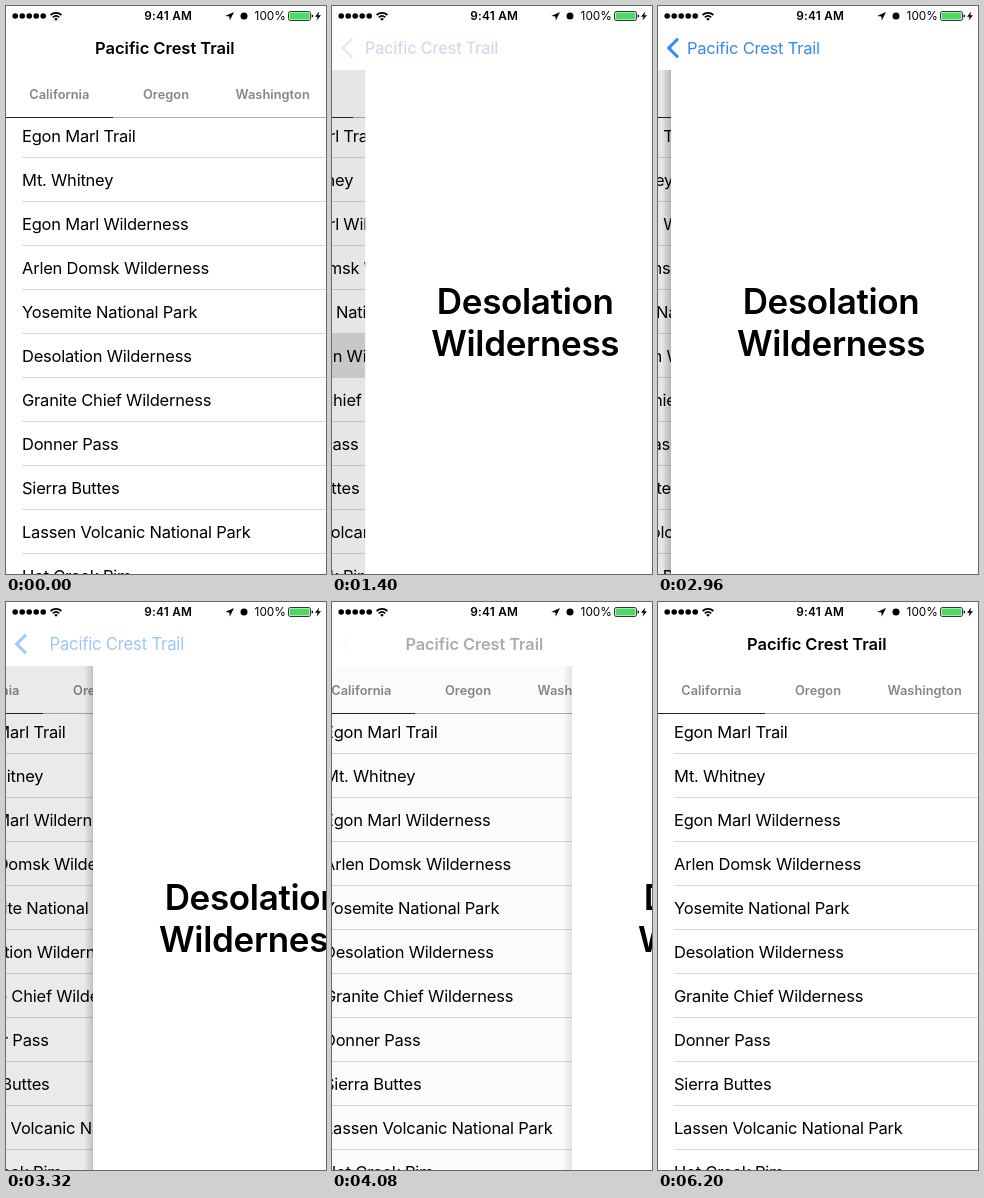
Recreate the animation shown at these times as an HTML page. Size 320x568 px, loop 6.6 s.

```html
<!DOCTYPE html>
<html lang="en">
<head>
<meta charset="utf-8">
<title>Trail list</title>
<style>
  html, body { margin: 0; width: 100%; height: 100%; overflow: hidden; background: #fff; }
  svg { display: block; width: 320px; height: 568px; }
  text { font-family: Inter, Roboto, sans-serif; white-space: pre; }
  .row { font-size: 16.5px; letter-spacing: -.22px; }
  .tab { font-size: 12.8px; font-weight: 600; letter-spacing: .05px; fill: #868686; text-anchor: middle; }
  .heading { font-size: 35px; font-weight: 600; letter-spacing: -.33px; text-anchor: middle; }
  .title { font-size: 16.5px; font-weight: 600; letter-spacing: -.03px; }
  .back { font-size: 16.5px; letter-spacing: -.22px; fill: #1c7cf2; }
  .status { font-size: 11.8px; }
</style>
</head>
<body>
<svg viewBox="0 0 320 568">
  <defs>
    <linearGradient id="fade">
      <stop offset="0" stop-opacity="0"/>
      <stop offset="1" stop-opacity=".22"/>
    </linearGradient>
  </defs>

  <g id="list">
    <rect y="64" width="320" height="504" fill="#fff"/>
    <g id="rows"></g>
    <g id="tabs"></g>
    <rect y="111" width="320" height="1" fill="#b0b0b0"/>
    <rect y="111" width="107" height="1" fill="#222"/>
  </g>
  <rect id="dim" y="64" width="320" height="504"/>

  <g id="detail">
    <rect id="shadow" x="-9" y="64" width="9" height="504" fill="url(#fade)"/>
    <rect y="64" width="320" height="504" fill="#fff"/>
    <text class="heading" x="160" y="307.7">Desolation</text>
    <text class="heading" x="160" y="350.3">Wilderness</text>
  </g>

  <rect width="320" height="64" fill="#fff"/>
  <path id="chevron" d="M20 32.8 10.8 42 20 51.2" fill="none" stroke="#1c7cf2" stroke-width="3"/>
  <text id="back" class="back">Pacific Crest Trail</text>
  <text id="title" class="title">Pacific Crest Trail</text>

  <g id="status">
    <g id="dots"></g>
    <g fill="none" stroke="#000" stroke-width="1.7">
      <path d="M44.6 9A8 8 0 0 1 55.4 9"/>
      <path d="M46.8 11.4A4.8 4.8 0 0 1 53.2 11.4"/>
    </g>
    <path d="M48.2 12.9A2.7 2.7 0 0 1 51.8 12.9L50 14.8Z"/>
    <text class="status" x="162.2" y="14.2" text-anchor="middle" font-weight="600" letter-spacing=".27">9:41 AM</text>
    <path d="M228 6 223.8 14.6 223.4 10.4 219.2 10Z"/>
    <circle cx="238" cy="10" r="3.5"/>
    <text class="status" x="248.6" y="14.2">100%</text>
    <rect x="282.5" y="5.5" width="22" height="9" rx="1.8" fill="#fff" stroke="#000" stroke-width=".8"/>
    <rect x="283.6" y="6.6" width="19.8" height="6.8" rx=".8" fill="#4cd964"/>
    <path d="M305.7 8.3Q307.2 8.8 307.2 10T305.7 11.7Z"/>
    <path d="M313.2 5.6 309 10.7H311.6L310.6 14.6 315 9.3H312.3Z"/>
  </g>
</svg>

<script>
const LOOP = 6600, STEP = 40, WIDTH = 320, SELECTED = 5;
const PUSH = { start: 1208, length: 500 };
const DRAG = [[2920, 0], [2960, 13], [3320, 87], [3760, 165], [4080, 240],
              [4120, 251], [4160, 273], [4200, 293], [4240, 309], [4280, 320]];
const places = ['Egon Marl Trail', 'Mt. Whitney', 'Egon Marl Wilderness', 'Arlen Domsk Wilderness',
  'Yosemite National Park', 'Desolation Wilderness', 'Granite Chief Wilderness', 'Donner Pass',
  'Sierra Buttes', 'Lassen Volcanic National Park', 'Hot Creek Rim'];

const get = id => document.getElementById(id);
const [list, rows, tabs, dim, detail, shadow, chevron, back, title, dots] =
  ['list', 'rows', 'tabs', 'dim', 'detail', 'shadow', 'chevron', 'back', 'title', 'dots'].map(get);

function add(parent, tag, attrs, text = '') {
  const node = document.createElementNS(parent.namespaceURI, tag);
  for (const key in attrs) node.setAttribute(key, attrs[key]);
  node.textContent = text;
  return parent.appendChild(node);
}

places.forEach((_, i) => add(rows, 'rect', { x: 16, y: 151 + 44 * i, width: 304, height: 1, fill: '#d7d7d9' }));
const highlight = add(rows, 'rect', { y: 107 + 44 * SELECTED, width: WIDTH, height: 45, fill: '#dedede' });
places.forEach((name, i) => add(rows, 'text', { class: 'row', x: 16, y: 136 + 44 * i }, name));
['California', 'Oregon', 'Washington'].forEach((name, i) =>
  add(tabs, 'text', { class: 'tab', x: WIDTH / 6 * (2 * i + 1), y: 92.5 }, name));
for (let i = 0; i < 5; i++) add(dots, 'circle', { cx: 9.2 + 7 * i, cy: 10, r: 2.8 });

const clamp = v => Math.min(1, Math.max(0, v));
const bezier = (s, a, b) => 3 * (1 - s) ** 2 * s * a + 3 * (1 - s) * s * s * b + s ** 3;

function pushEase(x) {
  let low = 0, high = 1;
  for (let i = 0; i < 24; i++) {
    const mid = (low + high) / 2;
    if (bezier(mid, .2833, .3183) < x) low = mid; else high = mid;
  }
  return bezier(low, .99, .99);
}

function dragged(t) {
  const i = DRAG.findIndex(([time]) => time >= t);
  if (i < 0) return WIDTH;
  if (i === 0) return 0;
  const [t0, x0] = DRAG[i - 1], [t1, x1] = DRAG[i];
  return x0 + (x1 - x0) * (t - t0) / (t1 - t0);
}

// open: 1 shows the list, 0 shows the detail page
function pose(t) {
  if (t >= 2000) {
    const open = dragged(t) / WIDTH;
    return { open, fade: open };
  }
  const time = clamp((t - PUSH.start) / PUSH.length);
  return { open: 1 - pushEase(time), fade: 1 - time ** .75 };
}

function moveLabel(node, open, scale, opacity) {
  node.setAttribute('transform', `translate(${26.4 + 62.7 * open} 48.2) scale(${scale})`);
  node.setAttribute('opacity', opacity);
}

function draw(t) {
  const { open, fade } = pose(t);
  const blue = (1 - fade) ** 2.7;
  const popping = t > 2920 && open < 1;
  list.setAttribute('transform', `translate(${-.3 * WIDTH * (1 - open)})`);
  dim.setAttribute('opacity', .05 * (1 + Math.cos(Math.PI * open)));
  detail.setAttribute('transform', `translate(${WIDTH * open})`);
  shadow.setAttribute('opacity', popping ? 1 - .75 * open : 0);
  highlight.setAttribute('opacity', t >= 920 && t < 2000 ? 1 : 0);
  chevron.setAttribute('opacity', blue);
  moveLabel(back, open, 1 + .053 * open, blue);
  moveLabel(title, open, .95 + .05 * open, fade ** 4);
}

const start = performance.now();
function tick() {
  const t = (performance.now() - start) % LOOP;
  draw(Math.floor(t / STEP) * STEP);
  requestAnimationFrame(tick);
}
tick();
</script>
</body>
</html>
```
